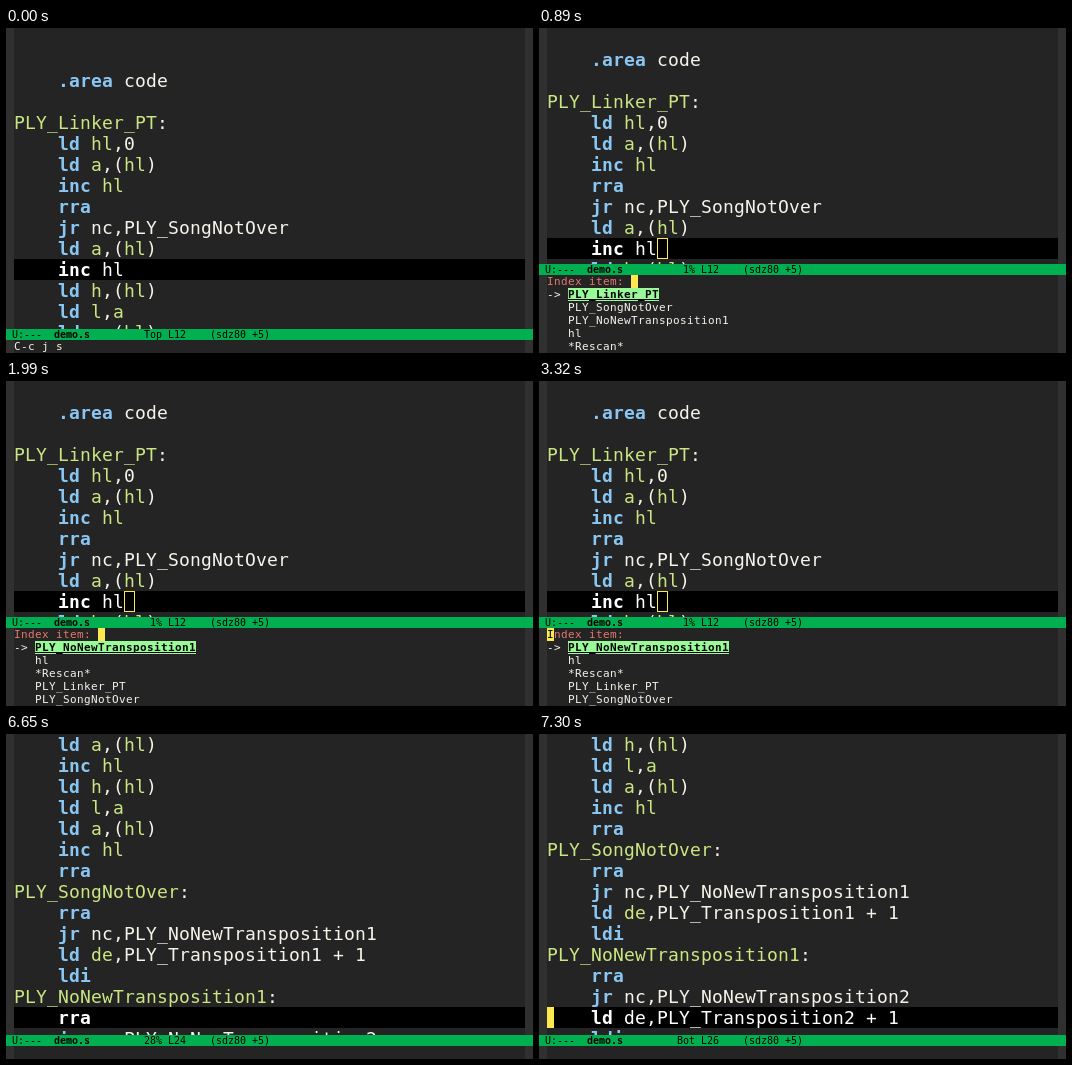
These frames come from a looping animation (527 by 325 pixels, 8 s). An HTML page:

```html
<!DOCTYPE html>
<html lang="en">
<head>
<meta charset="utf-8">
<title>Jumping to a label</title>
<style>
html, body { margin: 0; width: 100%; height: 100%; overflow: hidden; background: #242424; }
svg { display: block; }
text { font-family: "DejaVu Sans Mono", monospace; white-space: pre; fill: #f6f3e8; }
.code { font-size: 18px; }
.mini { font-size: 11px; }
.mode { font-size: 10px; fill: #000; }
.key { fill: #8ac6f2; font-weight: bold; }
.name { fill: #cae682; }
.lit { fill: #fff; }
.bold { font-weight: bold; }
.prompt { fill: #e5786d; }
.dark { fill: #000; }
.scene { opacity: 0; animation: 8s step-end infinite; }
</style>
</head>
<body>
<svg id="stage" width="527" height="325" viewBox="0 0 527 325"></svg>
<script>
const LOOP = 8000, ROW = 21, MINI = 13, LEFT = 8;
const YELLOW = '#fce94f', BACK = '#242424', FRINGE = '#303030';

const source = `

    .area code

PLY_Linker_PT:
    ld hl,0
    ld a,(hl)
    inc hl
    rra
    jr nc,PLY_SongNotOver
    ld a,(hl)
    inc hl
    ld h,(hl)
    ld l,a
    ld a,(hl)
    inc hl
    rra
PLY_SongNotOver:
    rra
    jr nc,PLY_NoNewTransposition1
    ld de,PLY_Transposition1 + 1
    ldi
PLY_NoNewTransposition1:
    rra
    jr nc,PLY_NoNewTransposition2
    ld de,PLY_Transposition2 + 1
    ldi`.split('\n');

const items = ['*Rescan*', 'PLY_Linker_PT', 'PLY_SongNotOver', 'PLY_NoNewTransposition1', 'hl'];

// top: first visible line, line: current line, pick: selected item, col: menu cursor column
const menu = { top: 2, line: 12, pos: ' 1%' };
const scenes = [
  { at: 0, top: 1, line: 12, pos: 'Top', echo: 'C-c j s' },
  { at: 500, ...menu, pick: 0, col: 12 },
  { at: 890, ...menu, pick: 1, col: 12 },
  { at: 1470, ...menu, pick: 2, col: 12 },
  { at: 1990, ...menu, pick: 3, col: 12 },
  { at: 3320, ...menu, pick: 3, col: 0 },
  { at: 6120, top: 10, line: 23, pos: '21%' },
  { at: 6650, top: 11, line: 24, pos: '28%' },
  { at: 6960, top: 12, line: 25, pos: '32%', cursor: true },
  { at: 7300, top: 13, line: 26, pos: 'Bot', cursor: true }
];

function add(parent, tag, attrs) {
  const el = document.createElementNS('http://www.w3.org/2000/svg', tag);
  for (const k in attrs) el.setAttribute(k, attrs[k]);
  return parent.appendChild(el);
}

const rect = (g, x, y, width, height, fill) => add(g, 'rect', { x, y, width, height, fill });

// Monospace text on a fixed grid
function type(g, x, y, step, cls, str) {
  const xs = [...str].map((_, i) => x + i * step).join(' ');
  add(g, 'text', { x: xs, y, class: cls }).textContent = str;
}

const code = (g, col, y, cls, str) => type(g, LEFT + col * 11, y, 11, 'code ' + cls, str);
const mini = (g, col, row, top, cls, str) => type(g, LEFT + col * 7, top + row * MINI + 10, 7, 'mini ' + cls, str);
const mode = (g, col, y, cls, str) => type(g, 6 + col * 6, y, 6, 'mode ' + cls, str);

function codeLine(g, str, y, lit) {
  const token = /^PLY_\w+|^ +\S+|\b(?:hl|de|[ahl])\b|(?:(?!\b(?:hl|de|[ahl])\b).)+/g;
  for (const { 0: part, index } of str.matchAll(token)) {
    const word = part.trimStart();
    if (!word) continue;
    const col = index + part.length - word.length;
    let cls = '';
    if (index === 0 && part !== word) cls = lit ? 'lit bold' : 'key';
    else if (lit) cls = 'lit';
    else if (index === 0 || /^(hl|de|[ahl])$/.test(word)) cls = 'name';
    code(g, col, y, cls, word);
  }
}

function drawMenu(g, s, top) {
  mini(g, 0, 0, top, 'prompt', 'Index item:');
  rect(g, LEFT + s.col * 7, top, 7, MINI, YELLOW);
  if (s.col === 0) mini(g, 0, 0, top, 'dark', 'I');
  mini(g, 0, 1, top, '', '->');
  items.forEach((_, i) => {
    const item = items[(s.pick + i) % items.length];
    if (i === 0) {
      rect(g, 29, top + MINI, item.length * 7, MINI, '#98fb98');
      rect(g, 29, top + MINI + 11, item.length * 7, 1, '#000');
    }
    mini(g, 3, i + 1, top, i ? '' : 'dark bold', item);
  });
}

function drawScene(g, s) {
  const open = s.pick !== undefined;
  const bottom = open ? 247 : 312;
  const y = (s.line - s.top) * ROW;

  rect(g, 0, 0, 527, 325, BACK);
  rect(g, LEFT, y, 511, ROW, '#000');
  for (let n = s.top; (n - s.top) * ROW < bottom - 11 && n <= source.length; n++)
    codeLine(g, source[n - 1], (n - s.top) * ROW + 17, n === s.line);
  if (open) add(g, 'rect', { x: 118.5, y: y + .5, width: 10, height: 20, fill: 'none', stroke: YELLOW });
  if (s.cursor) rect(g, LEFT, y, 7, ROW, YELLOW);

  rect(g, 0, bottom, 527, 325 - bottom, BACK);
  rect(g, 0, 0, 8, 325, FRINGE);
  rect(g, 519, 0, 8, 325, FRINGE);
  rect(g, 0, bottom - 11, 527, 11, '#00b050');
  mode(g, 0, bottom - 2, '', 'U:---');
  mode(g, 7, bottom - 2, 'bold', 'demo.s');
  mode(g, 22, bottom - 2, '', s.pos);
  mode(g, 26, bottom - 2, '', 'L' + s.line);
  mode(g, 33, bottom - 2, '', '(sdz80 +5)');

  if (open) drawMenu(g, s, bottom);
  if (s.echo) mini(g, 0, 0, bottom, '', s.echo);
}

const stage = document.getElementById('stage');
let rules = '';
scenes.forEach((s, i) => {
  const end = i + 1 < scenes.length ? scenes[i + 1].at : LOOP;
  const pct = t => t / LOOP * 100 + '%';
  rules += `@keyframes show${i} { 0% { opacity: 0 } ${pct(s.at)} { opacity: 1 } ${pct(end)} { opacity: 0 } }\n`;
  const g = add(stage, 'g', { class: 'scene', style: `animation-name: show${i}` });
  drawScene(g, s);
});
document.head.appendChild(document.createElement('style')).textContent = rules;
</script>
</body>
</html>
```
